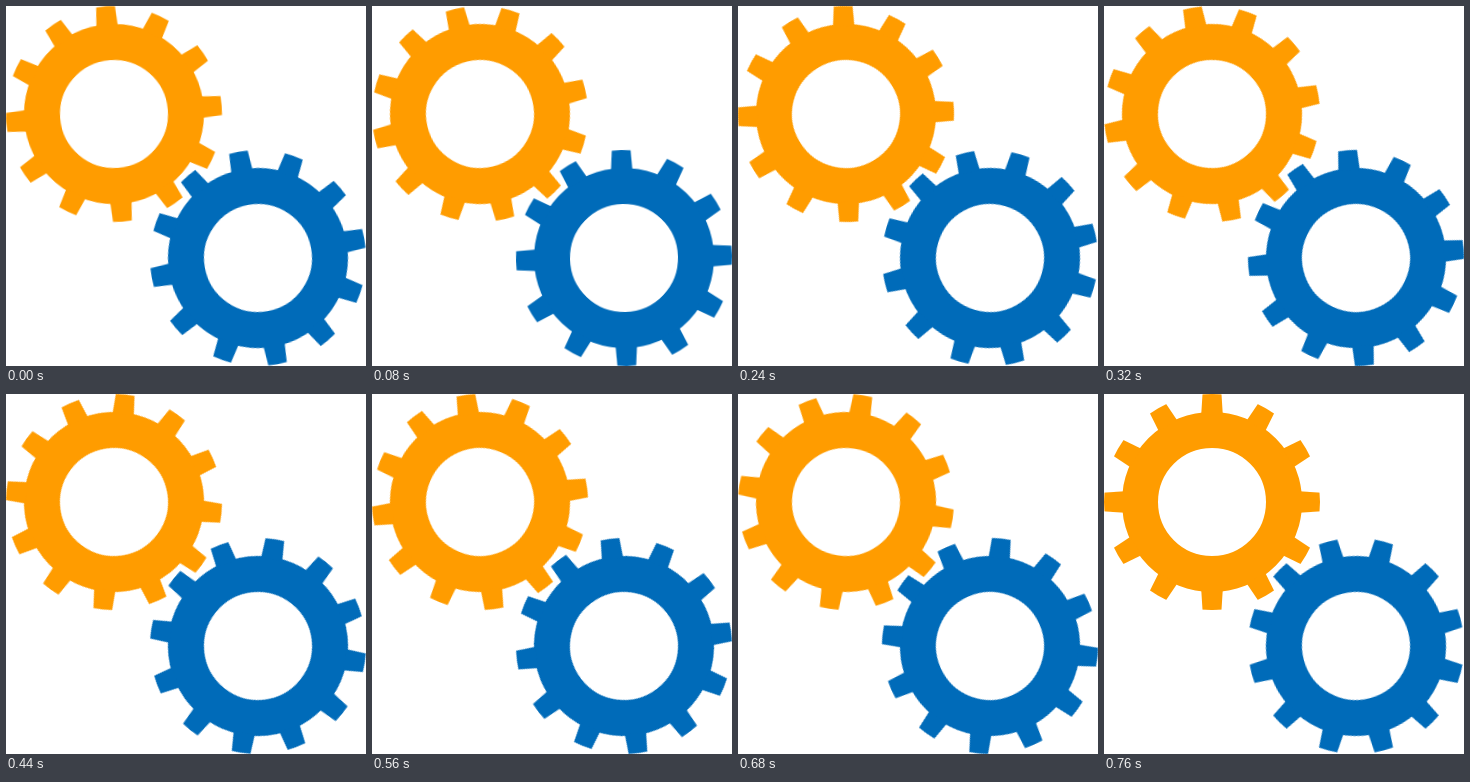
Recreate the animation shown at these times as an HTML page without scripts. Size 360 px wide and 360 px high, loop 0.8 s.

```html
<!DOCTYPE html>
<html lang="en">
<head>
<meta charset="utf-8">
<title>Gears</title>
<style>
  html, body { margin: 0; width: 100%; height: 100%; overflow: hidden; background: #fff; }
  svg { display: block; width: 100%; height: 100%; }
  .spin { animation: turn 800ms steps(20, end) infinite; }
  .orange { color: #ff9c00; --from: -4.5deg; --to: -94.5deg; }
  .blue { color: #006bb9; --from: -10.5deg; --to: 79.5deg; }
  @keyframes turn {
    from { transform: rotate(var(--from)); }
    to { transform: rotate(var(--to)); }
  }
</style>
</head>
<body>
<svg viewBox="0 0 360 360">
  <defs>
    <path id="tooth" d="M-10.7 -88 L-9.4 -107.6 A108 108 0 0 1 9.4 -107.6 L10.7 -88 Z"/>
    <g id="quarter">
      <use href="#tooth"/>
      <use href="#tooth" transform="rotate(30)"/>
      <use href="#tooth" transform="rotate(60)"/>
    </g>
    <g id="gear" fill="currentColor">
      <circle r="72" fill="none" stroke="currentColor" stroke-width="36"/>
      <use href="#quarter"/>
      <use href="#quarter" transform="rotate(90)"/>
      <use href="#quarter" transform="rotate(180)"/>
      <use href="#quarter" transform="rotate(270)"/>
    </g>
  </defs>
  <g transform="translate(108 108)">
    <g class="spin orange"><use href="#gear"/></g>
  </g>
  <g transform="translate(252 252)">
    <g class="spin blue"><use href="#gear"/></g>
  </g>
</svg>
</body>
</html>
```
